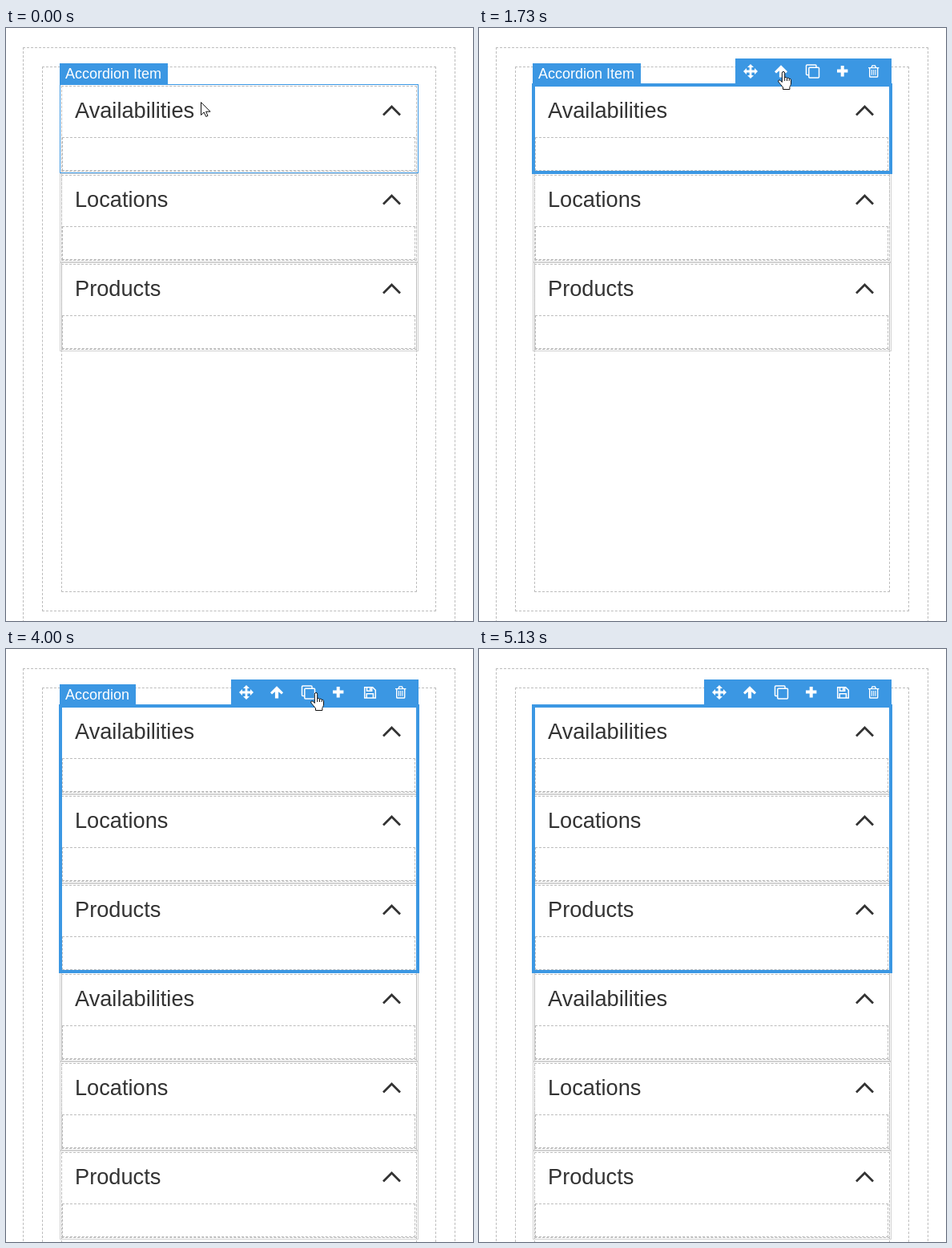
Animation of 583 by 739 pixels, one loop 5.94 s. Source, as an HTML page:

```html
<!DOCTYPE html>
<html lang="en">
<head>
<meta charset="utf-8">
<title>Duplicating an accordion</title>
<style>
  html, body { margin: 0; width: 100%; height: 100%; overflow: hidden; background: #fff; }
  #stage { position: relative; width: 583px; height: 739px; overflow: hidden;
    font-family: "Liberation Sans", Arial, sans-serif; }
  #stage div, #stage svg { position: absolute; box-sizing: border-box; }
  .dashed { border: 1px dashed #bdbdbd; }
  .outline { border: 1px solid #d2d2d2; }
  .title { left: 86px; font-size: 27.2px; line-height: 61px; color: #333; white-space: nowrap; }
  #hover { left: 67px; width: 448px; height: 111px; border: 1px solid #3b97e3; }
  #selection { left: 66px; top: 69px; width: 450px; border: 4px solid #3b97e3; }
  #label { left: 67px; height: 26px; padding: 0 8px 0 7px; background: #3b97e3; color: #fff;
    font-size: 18px; line-height: 26px; white-space: nowrap; }
  #overlay { left: 0; top: 0; }
</style>
</head>
<body>
<div id="stage">
  <div id="page"></div>
  <div id="selection"></div>
  <div id="hover"></div>
  <div id="label"></div>
  <svg id="overlay" width="583" height="739" fill="none">
    <g id="toolbar">
      <rect id="bar" y="38" height="32" fill="#3b97e3"/>
      <g id="tools">
        <path fill="#fff" d="M300 45l4 4h-2.6v3.6h3.6v-2.6l4 4-4 4v-2.6h-3.6v3.6h2.6l-4 4-4-4h2.6v-3.6h-3.6v2.6l-4-4 4-4v2.6h3.6v-3.6h-2.6z"/>
        <path fill="#fff" d="M338 46.3l8 8-2 2.2-3.9-3.2v8.2h-4.2v-8.2l-3.9 3.2-2-2.2z"/>
        <g stroke="#fff" stroke-width="1.5">
          <path d="M372.5 58.5h-2a1 1 0 0 1-1-1v-10.5a1 1 0 0 1 1-1h10.5a1 1 0 0 1 1 1v2"/>
          <rect x="372.8" y="49.3" width="12.7" height="12.7" rx="1"/>
        </g>
        <path stroke="#fff" stroke-width="4" d="M408 53.5h13.4M414.7 47v13.4"/>
      </g>
      <g id="save" stroke="#fff" stroke-width="1.5">
        <path d="M447.7 47.7h10l3.6 3.6v9.6h-13.6zM450.2 60.5v-4.7h8.2v4.7"/>
        <path d="M450.5 48v4.2h6.2V48" />
        <path d="M454.8 48.5v3" stroke-width="2"/>
      </g>
      <g stroke="#fff" stroke-width="1.4">
        <path d="M486 49.6h13.4M490 49.2l1-2.3h3.4l1 2.3M487.7 50v10.2q0 .8.8.8h8.4q.8 0 .8-.8V50"/>
        <path d="M490.4 52v6.8M492.7 52v6.8M495 52v6.8" stroke-width="1.1"/>
      </g>
    </g>
    <g id="arrow" fill="#fff" stroke="#111">
      <path d="M.5.6V16.5L4.2 13l2.5 5.4 2.3-1-2.4-5.2H12z"/>
    </g>
    <g id="hand" fill="#fff" stroke="#111">
      <path d="M5.3 13.5V2.2a1.7 1.7 0 0 1 3.4 0V8a1.6 1.6 0 0 1 2.8.6 1.6 1.6 0 0 1 2.7.8 1.5 1.5 0 0 1 2.3 1.4V15c0 2-1 3-1.6 4.5v3H6.5V20C5 18 2 14.5.8 13c-.8-1.5 1-2.9 2.5-1.6z"/>
      <path d="M8.7 7.5V12M11.5 8.5V12M14.2 9.5V12"/>
    </g>
  </svg>
</div>
<script>
const LOOP = 5940, PITCH = 111, FIRST = 72;
const el = id => document.getElementById(id);
const show = (node, visible) => { node.style.display = visible ? "" : "none"; };

const box = (cls, x, y, w, h) =>
  `<div class="${cls}" style="left:${x}px;top:${y}px;width:${w}px;height:${h}px"></div>`;

const item = (name, y) =>
  box("outline", 67, y - 2, 448, PITCH) +
  box("dashed", 69, y, 444, 107) +
  box("dashed", 70, y + 64, 441, 42) +
  `<div class="title" style="top:${y}px">${name}</div>
   <svg style="left:468px;top:${y + 22}px" width="28" height="18" fill="none">
     <path d="M3 14.5L13.5 4 24 14.5" stroke="#333" stroke-width="2.7"/></svg>`;

const accordion = y =>
  ["Availabilities", "Locations", "Products"].map((name, i) => item(name, y + i * PITCH)).join("");

function drawPage(copied) {
  const extra = copied ? 57 : 0;
  el("page").innerHTML =
    [0, 24, 48].map(d => box("dashed", 21 + d, 24 + d, 540 - 2 * d, 727 - 2 * d + extra)).join("") +
    accordion(FIRST) + (copied ? accordion(FIRST + 3 * PITCH) : "");
}

// Pointer keys: tick, x, y
const keys = [
  [0, 243, 92], [8, 258, 114], [11, 258, 114], [17, 334, 72], [19, 360, 58], [20, 371, 59],
  [23, 371, 60], [26, 373, 54], [36, 373, 54], [37, 382, 54], [40, 400, 54], [42, 400, 54],
  [47, 392, 54], [48, 392, 54], [51, 380, 54], [63, 380, 54], [64, 380, 82], [66, 358, 190],
  [69, 307, 426], [72, 268, 627], [76, 235, 733], [77, 230, 760]
];

function pointerAt(tick) {
  const next = keys.findIndex(k => k[0] > tick);
  if (next < 0) return keys[keys.length - 1].slice(1);
  const [a, b] = [keys[next - 1], keys[next]];
  const p = (tick - a[0]) / (b[0] - a[0]);
  return [1, 2].map(i => Math.round(a[i] + (b[i] - a[i]) * p));
}

function place(node, visible, x, y) {
  show(node, visible);
  node.setAttribute("transform", `translate(${x} ${y})`);
}

let pageCopied;
function render(time) {
  // The screen was sampled 15 times a second, on a 10 ms clock.
  const tick = Math.floor((Math.floor(time / 10) * 10 + 4) * 0.015);
  const [x, y] = pointerAt(tick);
  const copied = tick >= 60, selected = tick >= 12, whole = tick >= 28;
  const leaving = tick >= 64, gone = tick >= 77;

  if (copied !== pageCopied) drawPage(pageCopied = copied);

  const index = leaving ? Math.max(0, Math.floor((y - FIRST + 2) / PITCH)) : 0;
  const top = FIRST + index * PITCH;
  const onWhole = whole && !leaving;
  show(el("hover"), !gone && !onWhole);
  el("hover").style.top = top - 2 + "px";
  show(el("label"), !gone);
  el("label").style.top = top - 28 + "px";
  el("label").textContent = onWhole ? "Accordion" : "Accordion Item";

  show(el("selection"), selected);
  el("selection").style.height = (whole ? 335 : 113) + "px";
  show(el("toolbar"), selected);
  show(el("save"), whole);
  el("bar").setAttribute("x", whole ? 281 : 320);
  el("bar").setAttribute("width", whole ? 234 : 195);
  el("tools").setAttribute("transform", `translate(${whole ? 0 : 39} 0)`);

  const onTools = tick >= 20 && !leaving;
  const hidden = gone || (tick >= 1 && tick < 8);
  place(el("hand"), onTools, x, y);
  place(el("arrow"), !onTools && !hidden, x, y);
}

function loop() {
  render(performance.now() % LOOP);
  requestAnimationFrame(loop);
}
loop();
</script>
</body>
</html>
```
